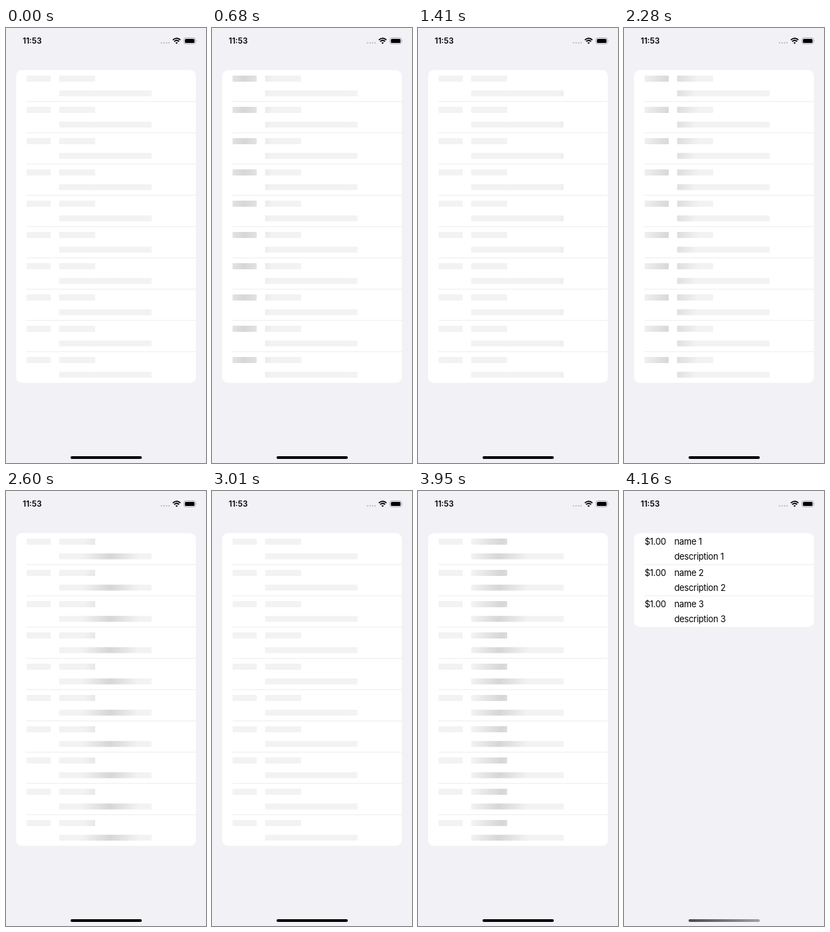
An HTML page that plays this animation: 296 px wide and 640 px high, repeating every 4.2 s.

```html
<!DOCTYPE html>
<html>
<head>
<meta charset="utf-8">
<style>
html, body { margin: 0; width: 100%; height: 100%; overflow: hidden; background: #f2f2f6; }
svg { display: block; width: 296px; height: 640px; }
text { font: 12.9px Inter, Roboto, sans-serif; letter-spacing: -.3px; }
.clock { font-size: 11.6px; font-weight: 600; letter-spacing: 0; }
</style>
</head>
<body>
<svg viewBox="0 0 296 640">
  <defs>
    <linearGradient id="shine" gradientUnits="userSpaceOnUse" x1="-41" y1="-6.6" x2="41" y2="6.6">
      <stop offset="0" stop-opacity=".05"/>
      <stop offset=".5" stop-opacity=".16"/>
      <stop offset="1" stop-opacity=".05"/>
    </linearGradient>
    <linearGradient id="fade">
      <stop offset="0" stop-color="#4a4a4c"/>
      <stop offset="1" stop-color="#a0a0a3"/>
    </linearGradient>
  </defs>

  <text class="clock" x="24.8" y="23.1">11:53</text>
  <g fill="#b9b9bd">
    <circle cx="230.2" cy="21.8" r="1.1"/><circle cx="233.9" cy="21.8" r="1.1"/>
    <circle cx="237.6" cy="21.8" r="1.1"/><circle cx="241.2" cy="21.8" r="1.1"/>
  </g>
  <g fill="none" stroke="#000" stroke-width="1.8">
    <path d="M246.9 17.6q5.6-5 11.2 0M248.9 19.9q3.6-3.2 7.2 0"/>
    <path d="M250.7 21.7q1.8-1.3 3.6 0l-1.8 1.8z" fill="#000" stroke="none"/>
  </g>
  <rect x="263.4" y="14.5" width="17" height="8.8" rx="2.6" fill="none" stroke="#a5a5a9" stroke-width=".9"/>
  <rect x="264.8" y="15.9" width="14.2" height="6" rx="1.5"/>
  <path d="M281.3 17.4q1.6 1.5 0 3z" fill="#a5a5a9"/>

  <rect id="card" x="15" y="62" width="266" rx="8.5" fill="#fff"/>
  <g id="skeleton"></g>
  <g id="items"></g>
  <rect id="home" x="95.5" y="630" width="105.5" height="4" rx="2"/>
</svg>
<script>
const LOOP = 4200, LOADED = 4160, SPEED = .28, PITCH = 46;
// Moments at which the picture refreshes, and when each sweep crosses x = 0.
const ticks = [0, 570, 680, 790, 890, 1000, 1110, 1210, 1310, 1410,
  2080, 2180, 2280, 2380, 2490, 2600, 2710, 2810, 2910, 3010,
  3640, 3740, 3850, 3950, 4050, LOADED];
const sweeps = [{from: 570, zero: 514}, {from: 2080, zero: 2043}, {from: 3640, zero: 3515}];

const $ = id => document.getElementById(id);
const bar = (x, y, w, h) => `<rect x="${x}" y="${y}" width="${w}" height="${h}" rx=".8"/>`;
const label = (x, y, s) => `<text x="${x}" y="${y}">${s}</text>`;

function rows(count, content) {
  let out = '';
  for (let i = 0; i < count; i++) {
    const line = i < count - 1 ? '<path d="M30 108.2H281" stroke="#e9e9eb" stroke-width=".8"/>' : '';
    out += `<g transform="translate(0 ${i * PITCH})">${content(i + 1)}${line}</g>`;
  }
  return out;
}

$('skeleton').innerHTML = rows(10, () => '<g fill="url(#shine)">' +
  bar(30.4, 70, 35.8, 9) + bar(78.6, 70, 53.4, 9) + bar(78.6, 91.8, 136.8, 8.8) + '</g>');
$('items').innerHTML = rows(3, n => label(30.4, 79.4, '$1.00') +
  label(74.4, 79.4, 'name ' + n) + label(74.4, 101, 'description ' + n));

function draw(now) {
  const t = ticks.findLast(k => k <= now % LOOP);
  const sweep = sweeps.findLast(s => s.from <= t);
  const peak = sweep ? (t - sweep.zero) * SPEED : -100;
  const loaded = t >= LOADED;
  $('shine').setAttribute('gradientTransform', `translate(${peak} 85)`);
  $('card').setAttribute('height', PITCH * (loaded ? 3 : 10));
  $('skeleton').style.display = loaded ? 'none' : '';
  $('items').style.display = loaded ? '' : 'none';
  $('home').setAttribute('fill', loaded ? 'url(#fade)' : '#000');
}

const start = performance.now();
function loop() {
  draw(performance.now() - start);
  requestAnimationFrame(loop);
}
loop();
</script>
</body>
</html>
```
